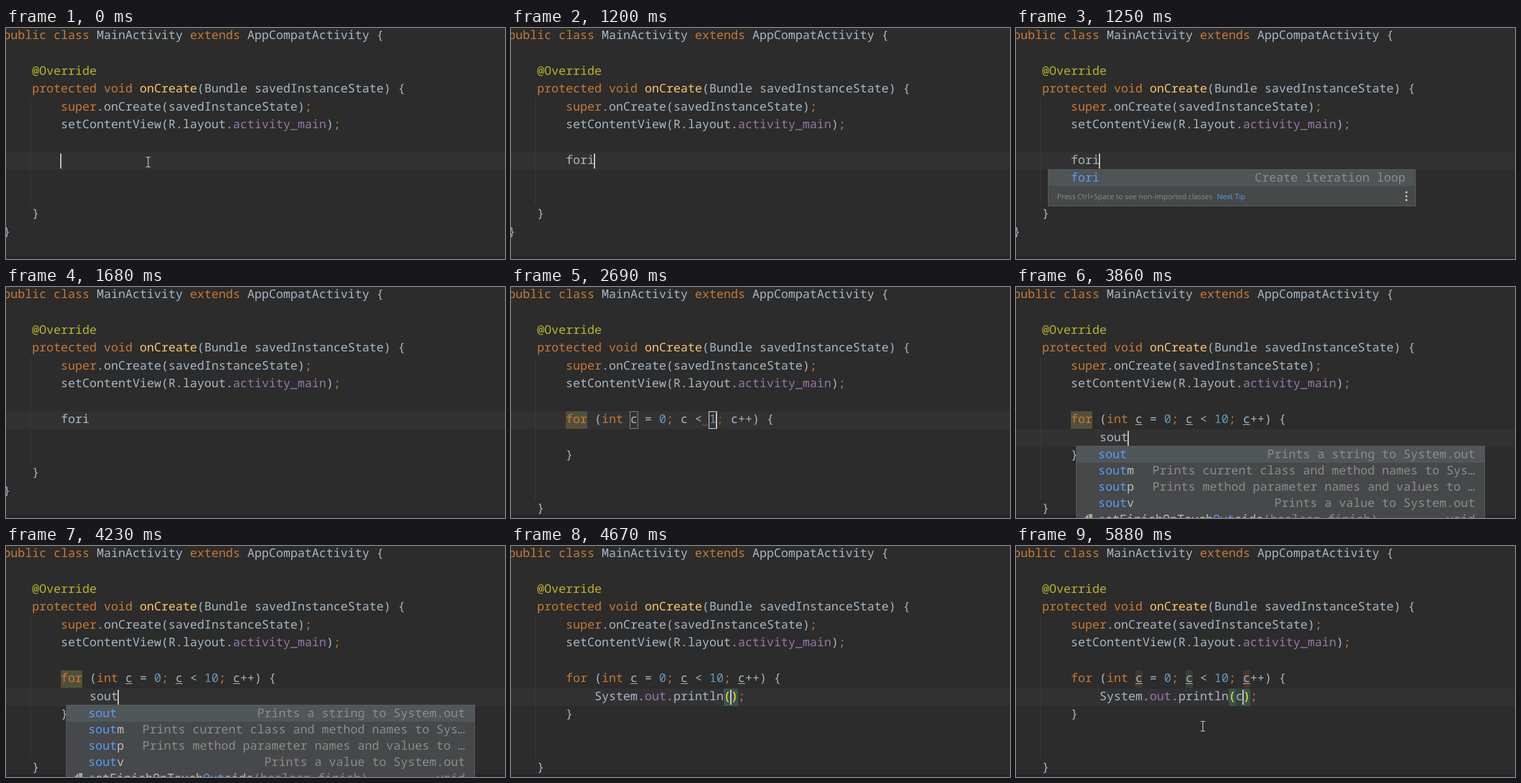
Recreate the animation shown at these times as an HTML page. Size 765 by 355 pixels, loop 5.96 s.

```html
<!DOCTYPE html>
<html lang="en">
<head>
<meta charset="utf-8">
<title>Live templates</title>
<style>
  html, body { margin: 0; width: 100%; height: 100%; overflow: hidden; background: #2b2c2b; }
  svg { display: block; width: 765px; height: 355px; }
  text { font: 18.333px "Noto Sans Mono", "DejaVu Sans Mono", monospace; white-space: pre; text-rendering: geometricPrecision; }
  .tip { font: 11.3px "Open Sans", "Noto Sans", sans-serif; }
</style>
</head>
<body>
<svg id="stage" viewBox="0 0 765 355"></svg>
<script>
const LOOP = 5960, CELL = 11, ROW = 27.4;
const C = {
  text: '#a9b7c6', key: '#cc7832', method: '#ffc66d', note: '#bbb529', field: '#9876aa',
  num: '#6897bb', match: '#589df6', pale: '#bbbbbb', grey: '#8c8c8c', brace: '#ffef28'
};

const colX = col => col * CELL - 4;
const baseline = row => Math.round(17.3 + ROW * row);
const rowTop = row => baseline(row) - 18;

const rect = (x, y, w, h, fill, extra = '') =>
  `<rect x="${x}" y="${y}" width="${w}" height="${h}" fill="${fill}" ${extra}/>`;
const escapeText = s => s.replace(/&/g, '&amp;').replace(/</g, '&lt;');
const label = (x, y, s, fill, extra = '') =>
  `<text x="${x}" y="${y}" fill="${fill}" ${extra}>${escapeText(s)}</text>`;

// Draws [string, color, attributes] runs one after another on the character grid.
function runs(x, y, parts) {
  return parts.map(([s, color = C.text, extra]) => {
    const out = label(x, y, s, color, extra);
    x += s.length * CELL;
    return out;
  }).join('');
}
const line = (row, col, ...parts) => runs(colX(col), baseline(row), parts);
const cellBack = (row, col, n, fill) => rect(colX(col), rowTop(row), n * CELL, 27, fill);
const italic = 'font-style="italic"';

const header =
  line(0, 0, ['public class ', C.key], ['MainActivity '], ['extends ', C.key], ['AppCompatActivity {']) +
  line(2, 4, ['@Override', C.note]) +
  line(3, 4, ['protected void ', C.key], ['onCreate', C.method], ['(Bundle savedInstanceState) {']) +
  line(4, 8, ['super', C.key], ['.onCreate(savedInstanceState)'], [';', C.key]) +
  line(5, 8, ['setContentView(R.layout.'], ['activity_main', C.field, italic], [')'], [';', C.key]);

// Each step changes part of the editor state.
const steps = [
  [0, { word: '', row: 7, caret: 8, mouse: [218, 206] }],
  [180, { caret: null, mouse: null }],
  [320, { word: 'fo', caret: 10 }],
  [360, { word: 'for', caret: 11 }],
  [1200, { word: 'fori', caret: 12 }],
  [1250, { popup: 'loop' }],
  [1630, { popup: null }],
  [1680, { caret: null }],
  [1820, { word: '', loop: true, name: 'i', end: '', mark: true }],
  [1870, { focus: 0, squiggle: true }],
  [1930, { caret: 18 }],
  [2360, { name: 'c', focus: 1, caret: 28 }],
  [2690, { end: '1', caret: 29, dim: true }],
  [2780, { end: '10', caret: 30, dim: false }],
  [3100, { squiggle: false }],
  [3150, { underline: true }],
  [3290, { focus: null, row: 8, caret: 12 }],
  [3430, { bulb: true }],
  [3570, { bulb: false, word: 's', caret: 13 }],
  [3620, { word: 'so', caret: 14 }],
  [3670, { word: 'sou', caret: 15 }],
  [3720, { word: 'sout', caret: 16 }],
  [3860, { popup: 'print' }],
  [4320, { popup: null, caret: null }],
  [4560, { word: '', print: true, arg: '', caret: 31, mark: false }],
  [4670, { parens: true }],
  [5090, { bulb: true }],
  [5230, { bulb: false, arg: 'c', caret: 32 }],
  [5300, { uses: true }],
  [5880, { mouse: [286.5, 277] }]
];

function forLoop(s) {
  const names = [17, 24, 30 + s.end.length];
  // The last name sits two cells after the semicolon that follows the limit.
  let out = '';
  if (s.mark) out += cellBack(7, 8, 3, '#52503a');
  if (s.uses) names.forEach((col, i) => out += cellBack(7, col, 1, i === 1 ? '#344134' : '#46352d'));
  if (s.focus === 0) out += cellBack(7, 17, 1, '#214283');
  out += line(7, 8, ['for ', C.key], ['('], ['int ', C.key], [s.name + ' = '], ['0', C.num], ['; ', C.key],
    [s.name + ' < '], [s.end, C.num], ['; ', C.key, s.dim ? 'opacity=".5"' : ''], [s.name + '++) {']);
  if (s.underline) names.forEach(col => out += rect(colX(col), 211, CELL, 1, C.text));
  if (s.squiggle) out += '<path d="M292 213l2.5-2 2.5 2 2.5-2 2.5 2" fill="none" stroke="#bc3f3c"/>';
  if (s.focus != null) {
    [[17, 1], [28, s.end.length]].forEach(([col, n], i) => {
      const color = i === s.focus ? '#e0e0e0' : '#85898c';
      out += rect(colX(col) - .5, 191.5, n * CELL + 1, 26, 'none', `stroke="${color}"`);
    });
  }
  return out;
}

function printCall(s) {
  const close = 31 + s.arg.length;
  let out = '';
  if (s.parens) out += cellBack(8, 30, 1, '#3b514d') + cellBack(8, close, 1, '#3b514d');
  if (s.uses) out += cellBack(8, 31, 1, '#344134');
  const paren = s.parens ? [C.brace, 'font-weight="700"'] : [];
  return out + line(8, 12, ['System.'], ['out', C.field, italic], ['.println'],
    ['(', ...paren], [s.arg], [')', ...paren], [';', C.key]);
}

const rightText = (x, y, s) => label(x - s.length * CELL, y, s, C.grey);

function loopPopup() {
  let out = rect(49.5, 217.5, 563, 56, '#46484a', 'stroke="#5a5d5f"') + rect(50, 218, 561, 25, '#4f5457') +
    label(84, 236, 'fori', C.match) + rightText(597, 236, 'Create iteration loop') +
    label(63, 263, 'Press Ctrl+Space to see non-imported classes', C.grey, 'class="tip"') +
    label(308, 263, 'Next Tip', C.match, 'class="tip"');
  for (const y of [251, 257, 263]) out += rect(597, y, 3, 3, '#b4b6b8');
  return out;
}

function printPopup() {
  const items = [
    ['', 'Prints a string to System.out'],
    ['m', 'Prints current class and method names to Sys…'],
    ['p', 'Prints method parameter names and values to …'],
    ['v', 'Prints a value to System.out']
  ];
  let out = rect(92.5, 244.5, 626, 120, '#46484a', 'stroke="#5a5d5f"') + rect(93, 245, 625, 25, '#515658');
  items.forEach(([tail, about], i) => {
    const y = 263 + 25 * i;
    out += runs(126, y, [['sout', C.match], [tail, C.pale]]) + rightText(704, y, about);
  });
  return out + runs(126, 363, [['s', C.match], ['etFinishOnTouch', C.pale], ['Out', C.match],
    ['side', C.pale], ['(boolean finish)', C.grey]]) + rightText(704, 363, 'void') +
    '<path d="M105 355l6-6v6zM112 349h5v6h-5z" fill="#a5a7a9"/>';
}

const mouse = ([x, y]) => `<path d="M${x - 3.5} ${y - 7.5}h2.5l1 1 1-1h2.5M${x} ${y - 7}v14` +
  `M${x - 3.5} ${y + 7.5}h2.5l1-1 1 1h2.5" fill="none" stroke="#c8c8c8" stroke-width="1.2"/>`;
const bulb = '<circle cx="14" cy="225" r="5.5" fill="#e2b03f"/>' +
  rect(11, 231, 6, 2, '#b0b2b4') + rect(11, 234, 6, 2, '#b0b2b4');

function draw(s) {
  const body = s.loop
    ? forLoop(s) + line(9, 8, ['}']) + line(12, 4, ['}'])
    : line(10, 4, ['}']) + line(11, 0, ['}']);
  return rect(0, 0, 765, 355, '#2b2c2b') + rect(0, 351, 765, 4, '#2a2325') +
    rect(0, rowTop(s.row), 765, 27, '#323232') +
    rect(37, 108, 1, s.loop ? 219 : 163, '#393a39') +
    header + body +
    (s.word ? line(s.row, s.row === 7 ? 8 : 12, [s.word]) : '') +
    (s.print ? printCall(s) : '') +
    (s.caret != null ? rect(colX(s.caret) - 1, rowTop(s.row) + 2, 2, 23, '#c8c8c8') : '') +
    (s.bulb ? bulb : '') +
    (s.popup === 'loop' ? loopPopup() : s.popup === 'print' ? printPopup() : '') +
    (s.mouse ? mouse(s.mouse) : '');
}

const stage = document.getElementById('stage');
const startTime = performance.now();
let shown = 0;

function tick() {
  const t = (performance.now() - startTime) % LOOP;
  const past = steps.filter(([at]) => at <= t);
  if (past.length !== shown) {
    shown = past.length;
    stage.innerHTML = draw(Object.assign({}, ...past.map(step => step[1])));
  }
  requestAnimationFrame(tick);
}
tick();
</script>
</body>
</html>
```
